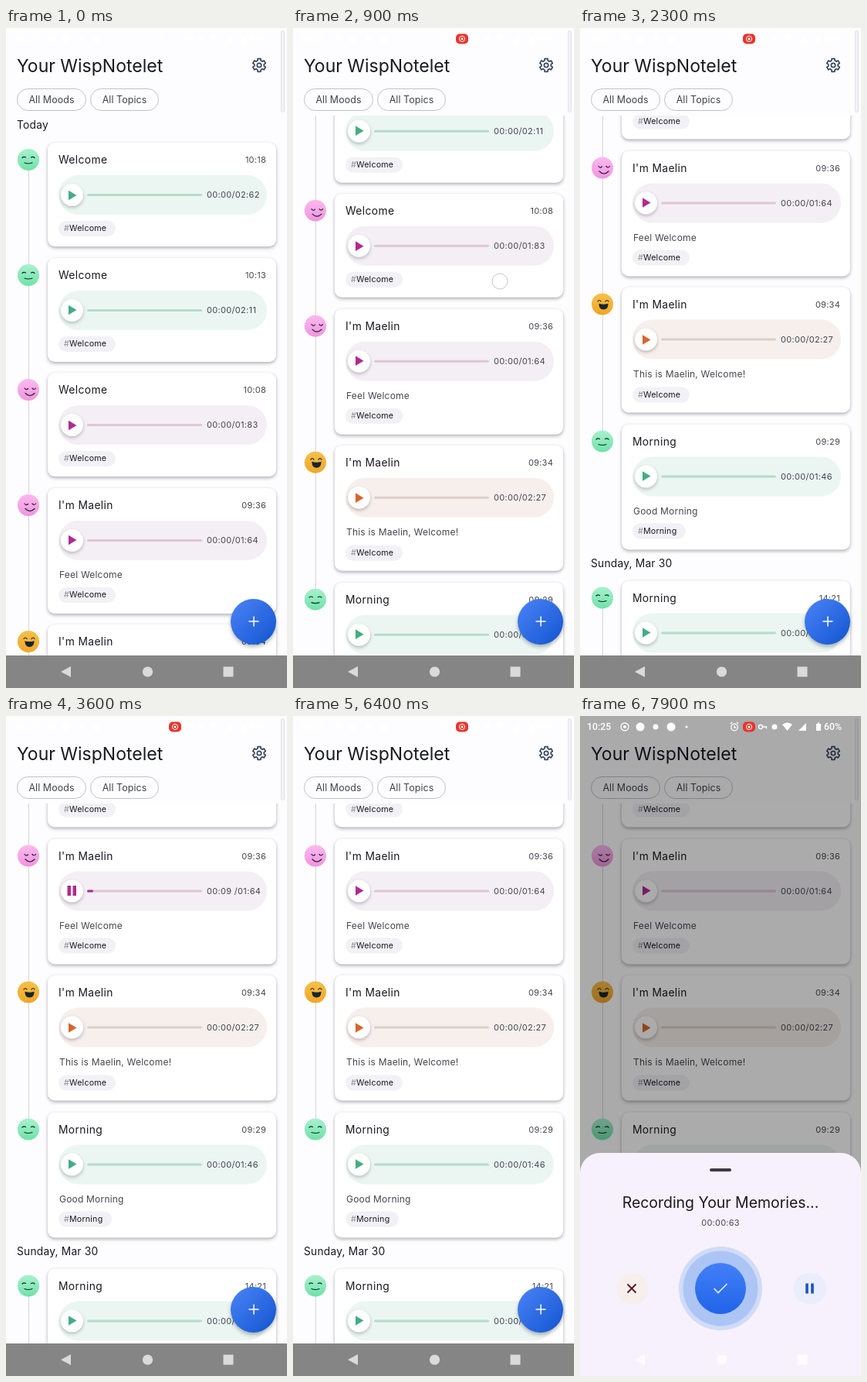
These frames come from a looping animation (364x852 px, 8 s). An HTML page:

```html
<!DOCTYPE html>
<html lang="en">
<head>
<meta charset="utf-8">
<title>Voice diary</title>
<style>
html, body { margin: 0; width: 100%; height: 100%; overflow: hidden; background: #fdfdff; }
#stage { position: relative; width: 364px; height: 852px; overflow: hidden; background: #fdfdff;
  font: 13.8px/20px Inter, Roboto, sans-serif; color: #18191f; white-space: pre; }
#stage div, #stage span, #stage svg { position: absolute; box-sizing: border-box; }
#stage svg { overflow: visible; }
#list { left: 0; top: 113px; width: 364px; height: 739px; overflow: hidden; }
#scroll { left: 0; top: -113px; width: 364px; }
.day { left: 14px; letter-spacing: .2px; }
.rail { left: 29px; width: 1px; background: #d6d6dc; }
.face { left: 15px; width: 28px; height: 28px; border-radius: 50%; }
.face svg { left: 14px; top: 14px; fill: none; stroke: #17252b; stroke-width: 1.2; stroke-linecap: round; }
.card { left: 54px; width: 296px; border-radius: 9px; background: #fff;
  box-shadow: 0 2px 4px rgba(0,0,0,.3), 0 0 2px rgba(0,0,0,.06); }
.name { left: 14px; top: 12px; letter-spacing: .4px; }
.time { right: 13px; top: 12px; font-size: 11px; letter-spacing: .25px; color: #45464f; }
.player { left: 14px; top: 42px; width: 270px; height: 51px; border-radius: 26px; background: var(--pale); }
.button { left: 2.5px; top: 11px; width: 29px; height: 29px; border-radius: 50%; background: #fff;
  box-shadow: 0 2px 4px rgba(0,0,0,.24); }
.button svg { left: 14.5px; top: 14.5px; fill: var(--main); }
.track { left: 37px; top: 24px; width: 149px; height: 3.4px; border-radius: 2px; background: var(--line); }
.fill { left: 0; top: 0; width: 0; height: 100%; border-radius: 2px; background: var(--main); }
.count { left: 192px; top: 15px; font-size: 11px; letter-spacing: .32px; color: #45464f; }
.note { left: 15px; top: 102px; font-size: 12px; letter-spacing: .2px; color: #45464f; }
.tag { left: 14px; height: 20px; padding: 0 12px 0 7px; border-radius: 10px; background: #f2f1f6;
  font-size: 10.7px; letter-spacing: .2px; }
.tag i { font-style: normal; color: #8d8e97; }
.title { left: 14px; top: 34px; font-size: 23px; line-height: 30px; }
.pill { top: 78px; height: 29px; width: 90px; border: 1px solid #bfc1cc; border-radius: 15px; text-align: center;
  font-size: 12.4px; line-height: 28px; color: #40434f; letter-spacing: .1px; }
.fab { left: 291px; top: 736.5px; width: 59px; height: 59px; border-radius: 50%;
  background: linear-gradient(135deg, #4c83f7, #1155cf); box-shadow: 0 3px 5px rgba(0,0,0,.28); }
.fab svg { left: 29.5px; top: 29.5px; stroke: #fff; stroke-width: 1.5; }
.edge { left: 356px; top: 3px; width: 5px; height: 106px; border-radius: 3px;
  background: #f3f3f6; border: 1px solid #e2e2e7; }
#nav { left: 0; top: 810px; width: 364px; height: 42px; background: #858585; }
#scrim { left: 0; top: 0; width: 364px; height: 852px; background: #000; }
#sheet { left: 0; top: 564px; width: 364px; height: 290px; border-radius: 26px 26px 0 0; background: #f7f1fd; }
.handle { left: 168px; top: 19.5px; width: 28px; height: 4px; border-radius: 2px; background: #3c3a45; }
.heading, #clock { left: 0; width: 364px; text-align: center; }
.heading { top: 49px; font-size: 19.45px; line-height: 30px; }
#clock { top: 79.5px; font-size: 11px; letter-spacing: .2px; color: #45464f; }
.dot { border-radius: 50%; transform: translate(-50%, -50%); }
#touch { width: 21px; height: 21px; border: 1.5px solid #c6c6ce; background: rgba(255,255,255,.7); }
#status { left: 0; top: 0; fill: none; stroke: #fff; stroke-width: 1.3; }
.bar { top: 4px; font: 500 12.3px/20px Roboto, sans-serif; color: #fff; }
</style>
</head>
<body>
<div id="stage">
  <div id="list"><div id="scroll"></div></div>
  <span class="title">Your WispNotelet</span>
  <svg id="gear" style="left:328px;top:48px" width="1" height="1"></svg>
  <div class="pill" style="left:14px">All Moods</div>
  <div class="pill" style="left:109px;width:89px">All Topics</div>
  <div class="fab"><svg width="1" height="1"><path d="M-6.5 0h13M0-6.5v13"/></svg></div>
  <div class="edge"></div>
  <div id="nav"></div>
  <div id="scrim"></div>
  <div id="sheet">
    <div class="handle"></div>
    <span class="heading">Recording Your Memories...</span>
    <span id="clock"></span>
    <div class="dot" style="left:68px;top:175px;width:41px;height:41px;background:#f6efeb"></div>
    <div class="dot" style="left:298px;top:175px;width:43px;height:41px;background:#eaedfc"></div>
    <div class="dot" id="pulse" style="left:182px;top:175px;width:108px;height:108px;background:#d0dcf7"></div>
    <div class="dot" style="left:182px;top:175px;width:97px;height:97px;background:#adc5f5"></div>
    <div class="dot" style="left:182px;top:175px;width:66px;height:66px;background:linear-gradient(#4380f7,#2064e8)"></div>
    <svg style="left:0;top:175px" width="1" height="1" fill="none" stroke-width="1.8">
      <path stroke="#5c1520" d="M61.500-5.500l11 11m0-11l-11 11"/>
      <path stroke="#e6edff" stroke-width="1.600" d="M173.500 0l5.500 5.500 11.500-11.500"/>
      <path stroke="#1c53c2" stroke-width="3.6" d="M294-6.5v13m7-13v13"/>
    </svg>
  </div>
  <svg id="keys" style="left:0;top:831px" width="1" height="1" fill="#dadada">
    <path d="M71 0l13-7v14z"/><circle cx="183.5" r="6.6"/><path d="M281.5-6.5h13v13h-13z"/>
  </svg>
  <svg id="status" width="364" height="28">
    <circle cx="58" cy="14" r="5"/>
    <g fill="#fff" stroke="none">
      <circle cx="58" cy="14" r="2"/><circle cx="78" cy="14" r="5.5"/><circle cx="98" cy="14" r="3.5"/>
      <circle cx="118" cy="14" r="5.5"/><circle cx="138" cy="14" r="1.5"/><circle cx="252" cy="14" r="3.5"/>
      <path d="M262 11q7-5 13 0l-6.500 8zM283 19l10-10v10zM306 10h2v-1.500h2v1.500h2v9h-6z"/>
    </g>
    <circle cx="200" cy="14.500" r="4.300"/><path d="M200 12v3h2M195 10l2-2m6 0l2 2"/>
    <circle cx="234" cy="14" r="2.500"/><path d="M236.500 14h5v2.500"/>
    <g id="live" stroke="#fff"><rect x="211" y="7.500" width="16" height="13" rx="5" fill="#e8352c" stroke="none"/>
      <circle cx="219" cy="14" r="3.600" stroke-width="1"/><circle cx="219" cy="14" r="1.500" fill="#fff" stroke="none"/></g>
  </svg>
  <span class="bar" style="left:9px">10:25</span><span class="bar" style="left:316px">60%</span>
  <div class="dot" id="touch"></div>
</div>
<script>
const $ = id => document.getElementById(id);
const clamp = (x, lo = 0, hi = 1) => Math.min(hi, Math.max(lo, x));
const two = n => String(Math.floor(n)).padStart(2, '0');
const LOOP = 8000;
const PLAY = 'M-4-6.300L6.500 0L-4 6.300z', PAUSE = 'M-5.500-6.500h4.500v13h-4.500zM1.500-6.500h4.500v13h-4.500z';

const moods = {
  calm: { main: '#43ae80', line: '#b5dccb', pale: '#ebf6f2', face: '#a8f1ce,#6fe2a8',
    art: '<path d="M-8-2.500q2-2 4.500-.500M3.500-3q2.500-1.500 4.500.500M-5 4q5 2 10 0"/>' },
  happy: { main: '#b02a90', line: '#dfc6d6', pale: '#f4eff4', face: '#fcb9ee,#f293df',
    art: '<path d="M-5-2q2 3 4.500.500M5-2q2.500 3 4.500 0M-4 4.500q6 6 12 0"/>' },
  joyful: { main: '#d7652a', line: '#dccfc9', pale: '#f6efec', face: '#f6c04a,#f0a628',
    art: '<path d="M-6-3.500q2-3 4 0M4-3.500q2-3 4 0"/><path fill="#17252b" d="M-4 0q5.500 1.500 11 0q-.500 6.500-5.500 6.500t-5.500-6.500z"/>' }
};

const entries = [
  ['calm', 'Welcome', '10:18', '02:62'],
  ['calm', 'Welcome', '10:13', '02:11'],
  ['happy', 'Welcome', '10:08', '01:83'],
  ['happy', "I'm Maelin", '09:36', '01:64', 'Feel Welcome'],
  ['joyful', "I'm Maelin", '09:34', '02:27', 'This is Maelin, Welcome!'],
  ['calm', 'Morning', '09:29', '01:46', 'Good Morning'],
  ['calm', 'Morning', '14:21', '01:52', 'Good Morning']
];

let y = 148;
let html = `<div class="rail" style="top:170px;height:798px"></div><div class="rail" style="top:1170px;height:160px"></div>
  <span class="day" style="top:115px">Today</span><span class="day" style="top:1115.500px">Sunday, Mar 30</span>`;
entries.forEach(([mood, name, time, length, note], i) => {
  if (i === 6) y = 1148.5;
  const m = moods[mood], tag = name === 'Morning' ? name : 'Welcome';
  html += `<div class="face" style="top:${y + 8}px;background:linear-gradient(${m.face})"><svg width="1" height="1">${m.art}</svg></div>
  <div class="card" style="top:${y}px;height:${note ? 162 : 134}px;--main:${m.main};--line:${m.line};--pale:${m.pale}">
    <span class="name">${name}</span><span class="time">${time}</span>
    <div class="player">
      <div class="button"><svg width="1" height="1"><path d="${PLAY}"/></svg></div>
      <div class="track"><div class="fill"></div></div><span class="count">00:00/${length}</span>
    </div>
    ${note ? `<span class="note">${note}</span>` : ''}
    <span class="tag" style="top:${note ? 128.5 : 101}px"><i>#</i>${tag}</span>
  </div>`;
  y += note ? 176.5 : 148.5;
});
$('scroll').innerHTML = html;

// Gear: an outline with six teeth around a hub
const rim = [];
for (let tooth = 0; tooth < 360; tooth += 60) {
  for (const [turn, r] of [[-20, 6.3], [-13, 8.6], [13, 8.6], [20, 6.3]]) {
    const a = (tooth + turn) * Math.PI / 180;
    rim.push(r * Math.sin(a) + ',' + -r * Math.cos(a));
  }
}
$('gear').innerHTML = `<g fill="none" stroke="#3a4660" stroke-width="1.700" stroke-linejoin="round">
  <polygon points="${rim.join(' ')}"/><circle r="2.700"/></g>`;

const active = document.querySelectorAll('.card')[3];
const [icon, fill, count] = ['.button path', '.fill', '.count'].map(s => active.querySelector(s));

// Drag and settle: [time, offset, speed]
const drag = [[250, 0, 0], [900, 231, .36], [1400, 387, .22], [1900, 435.5, 0]];
function offset(t) {
  if (t <= drag[0][0]) return 0;
  for (let i = 1; i < drag.length; i++) {
    const [t0, a, va] = drag[i - 1], [t1, b, vb] = drag[i];
    if (t > t1) continue;
    const d = t1 - t0, u = (t - t0) / d, v = 1 - u;
    return v * v * ((1 + 2 * u) * a + u * d * va) + u * u * ((3 - 2 * u) * b - v * d * vb);
  }
  return 435.5;
}

function touchAt(t, s) {
  if (t > 220 && t < 1550) return [241 + s * .116, 558 - s];
  if (t > 3380 && t < 3500) return [86, 226];
  if (t > 7080 && t < 7220) return [320, 766];
}

function draw(now) {
  const t = now % LOOP, s = offset(t);
  $('scroll').style.transform = `translateY(${-s}px)`;
  $('live').style.opacity = t < 150 ? 0 : 1;

  const finger = touchAt(t, s);
  $('touch').style.display = finger ? '' : 'none';
  if (finger) [$('touch').style.left, $('touch').style.top] = finger.map(v => v + 'px');

  const played = t - 3510, on = played >= 0 && played < 1640;
  icon.setAttribute('d', on ? PAUSE : PLAY);
  fill.style.width = (on ? played / 16.4 : 0) + '%';
  count.textContent = (on ? two(played / 1000) + ':' + two(played % 1000 / 10) + ' ' : '00:00') + '/01:64';

  const u = clamp((t - 7265) / 330), p = u * u * (3 - 2 * u);
  $('scrim').style.opacity = .33 * p;
  $('sheet').style.display = u ? '' : 'none';
  $('sheet').style.opacity = clamp(.3 + 2 * p);
  $('sheet').style.transform = `translateY(${288 * (1 - p)}px)`;
  $('keys').setAttribute('fill', p > .5 ? '#fefbff' : '#dadada');
  const rec = Math.max(0, t - 7270);
  $('clock').textContent = `00:${two(rec / 1000)}:${two(rec % 1000 / 10)}`;
  const k = .95 + .05 * Math.cos((t - 7900) / 1000 * 2 * Math.PI);
  $('pulse').style.transform = `translate(-50%,-50%) scale(${k})`;
}

function tick() {
  draw(performance.now());
  requestAnimationFrame(tick);
}
tick();
</script>
</body>
</html>
```
